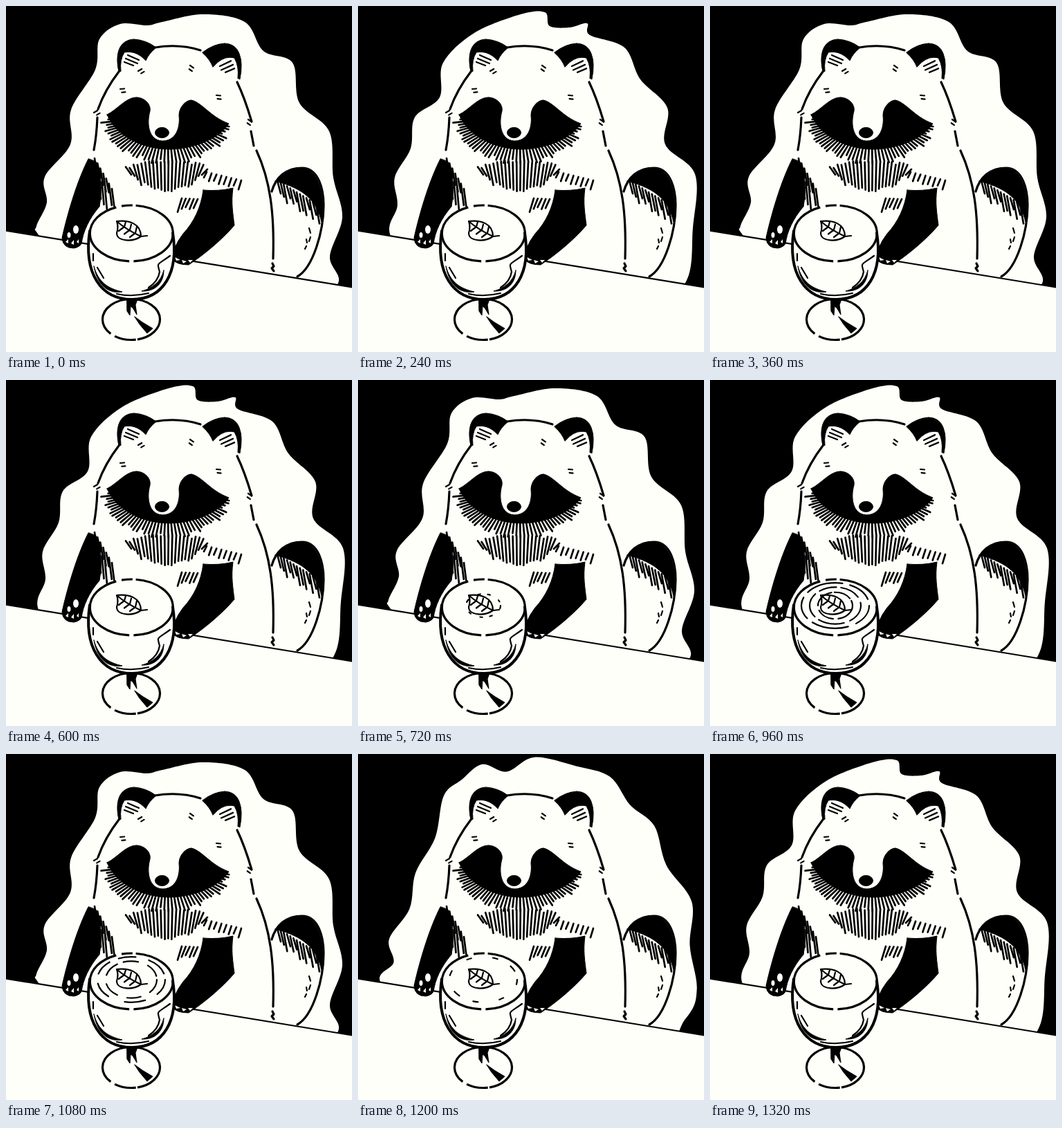
Recreate the animation shown at these times as an HTML page. Size 500 by 500 pixels, loop 1.44 s.

```html
<!DOCTYPE html>
<html lang="en">
<head>
<meta charset="utf-8">
<title>Raccoon and a drink</title>
<style>
html, body { margin: 0; width: 100%; height: 100%; overflow: hidden; background: #000; }
svg { display: block; width: 100vw; height: 100vh; }
path, ellipse { fill: none; stroke: #000; stroke-width: 3.2; stroke-linecap: round; stroke-linejoin: round; }
.ink { fill: #000; stroke-width: 1; }
.paper { fill: #fffffa; stroke: none; }
.thin { stroke-width: 2.2; }
.bold { stroke-width: 4; }
.ring { stroke-linecap: butt; }
/* the glow boils through three drawings, the ripple plays once per loop */
.glow, .ripple { visibility: hidden; animation: third 360ms step-end infinite; animation-delay: calc(var(--i) * 120ms - 360ms); }
.ripple { animation: twelfth 1440ms step-end infinite; animation-delay: calc(var(--i) * 120ms - 1440ms); }
@keyframes third { 0% { visibility: visible } 33.3333%, 100% { visibility: hidden } }
@keyframes twelfth { 0% { visibility: visible } 8.33333%, 100% { visibility: hidden } }
</style>
</head>
<body>
<svg viewBox="0 0 500 500">
  <defs>
    <path id="tick" class="thin" d="M0 0h6M2 5h5"/>
    <g id="ear">
      <path class="ink" d="M163 95C157 68 164 49 185 48Q202 49 217 60Q206 69 202 79C192 68 182 65 171 67Q164 78 166 94Z"/>
      <path class="thin" d="M176 71 192 78M173 76 190 83M171 81 184 86"/>
    </g>
  </defs>
  <g id="glow"></g>

  <path class="paper" d="M0 324.5 500 406.5V500H0Z"/>
  <path class="thin" d="M-2 324.2 502 406.8"/>
  <path class="paper" d="M125 300 270 290 330 310 318 333 270 366 130 340Z"/>

  <!-- tail -->
  <path d="M384 268C390 247 405 234 428 234C452 234 459 266 459 288C459 325 444 378 421 391"/>
  <path class="ink" d="M389 253C402 239 415 233 428 234C452 236 462 274 456 312C449 282 432 264 389 253Z"/>
  <path class="thin" d="M438 321 440 328M440 334 438 340M434 337 435 342M434 347 432 351"/>

  <!-- head and body -->
  <path d="M163 95Q143 121 133 149M132 161Q131 187 127 208M215 60Q250 54 281 64"/>
  <path d="M334 110Q345 133 355 167M354 181 358 202M362 209C382 252 388 300 386 365M385 372l2 4-3 3 3 4"/>
  <use href="#ear"/>
  <use href="#ear" transform="translate(501 1.2) scale(-1 1.1)"/>
  <path class="ink" d="M146 157C162 149 172 133 188 132C200 132 210 142 208 152C203 170 206 194 226 195C246 195 252 175 250 158C250 146 260 136 268 136C284 140 295 160 322 170C308 192 270 207 236 207C200 207 160 190 146 157Z"/>
  <ellipse class="ink" cx="225.5" cy="183" rx="10" ry="7.5"/>
  <g id="ticks"></g>
  <path id="fur" style="stroke-width:2.7"/>

  <!-- arms -->
  <path class="ink" d="M119 221C104 250 90 295 81 335Q82 350 98 350Q110 348 110 338C114 318 126 300 135 290Q142 255 130 225Z"/>
  <path class="ink" d="M285 266Q308 268 328 263C325 285 328 300 330 317C310 340 285 360 264 374Q246 374 241 366Q240 350 256 329C272 312 282 290 285 266Z"/>
  <ellipse class="paper" cx="101" cy="323" rx="4" ry="6"/>
  <ellipse class="paper" cx="91" cy="331" rx="2.5" ry="4"/>
  <path class="paper" d="M86 341l4-4v6ZM94 343l4-5v7ZM102 341l3-4v6ZM244 363l8 4-6 1ZM254 367l7 2-5 3ZM263 367h7l-4 4Z"/>

  <!-- glass -->
  <ellipse class="paper" cx="181" cy="453" rx="41.5" ry="29.5"/>
  <ellipse class="ring" cx="181" cy="453" rx="41.5" ry="29.5" pathLength="100" stroke-dasharray="21 1 14 3 61"/>
  <path class="paper" d="M121 325C112 385 136 424 182 424S250 385 241 328A60 40 0 0 0 121 325Z"/>
  <path class="bold" d="M121 325C112 385 136 424 182 424S250 385 241 328"/>
  <ellipse class="ring" cx="181.3" cy="328.5" rx="60" ry="40.5" pathLength="100" stroke-dasharray="24 2 42 2.5 5 1.5 23"/>
  <path class="ink" d="M127 376C133 398 146 408 168 413C150 416 132 406 127 376ZM228 382C224 398 212 408 196 412C214 413 228 402 228 382Z"/>
  <path class="thin" d="M160 416Q182 421 206 415M132 378 141 393M126 358V368M237 361C218 375 218 370 222 384Q220 398 206 407"/>
  <path class="ink" d="M175 424H190L187 432 189 446 183 436 180 434 179 447 175 441ZM186 449 197 457 212 466 204 473 193 460Z"/>

  <!-- leaf and ripples -->
  <path class="thin" d="M160 311C177 309 195 314 195 333C184 341 160 341 160 328Q163 319 160 311Q172 322 195 333L204 332"/>
  <path class="thin" id="veins"/>
  <g id="ripples"></g>
</svg>
<script>
const $ = id => document.getElementById(id);
let seed = 7;
const rnd = () => (seed = seed * 16807 % 2147483647) / 2147483647;
const range = n => [...Array(n).keys()];

// closed Catmull-Rom curve
function blob(p) {
  const at = i => p[(i + p.length) % p.length];
  return 'M' + p[0] + p.map((b, i) => {
    const a = at(i - 1), c = at(i + 1), e = at(i + 2);
    return `C${b.map((v, k) => v + (c[k] - a[k]) / 6)} ${c.map((v, k) => v - (e[k] - b[k]) / 6)} ${c}`;
  }).join('') + 'Z';
}

// crests and hollows of two outlines; the third moves the lobes half a step along
const points = s => s.match(/\d+ \d+/g).map(q => q.split(' ').map(Number));
const wide = points('48 332 44 318 59 284 56 247 93 200 94 150 129 92 135 48 165 26 204 28 226 23 285 12 345 23 372 65 414 82 424 140 467 181 473 248 486 305 468 362 478 404');
const tall = points('47 332 57 288 53 248 76 206 82 161 118 132 123 82 168 39 235 12 270 9 277 29 306 31 331 25 335 42 385 60 408 106 447 147 444 200 487 243 484 320 472 402');
const shifted = wide.slice(1).map((q, i) => {
  const out = 1.03 + (i % 2 ? -0.03 : 0.03);
  return [266, 230].map((c, k) => c + ((q[k] + wide[i][k]) / 2 - c) * out);
});
$('glow').innerHTML = [wide, shifted, tall].map((p, i) =>
  `<path class="paper glow" style="--i:${i}" d="${blob([...p, [400, 450], [100, 400]])}"/>`).join('');

const tick = (x, y, turn) => `<use href="#tick" transform="translate(${x} ${y}) rotate(${turn})"/>`;
$('ticks').innerHTML = tick(165, 120, -5) + tick(304, 129, 5) + tick(266, 86, 35) +
  tick(191, 94, -30) + tick(127, 154, -30) + tick(350, 164, 35);

const line = (...v) => { const [a, b, c, d] = v.map(n => n.toFixed(1)); return `M${a} ${b}L${c} ${d}`; };

// n strokes starting between two points
const row = (x1, y1, x2, y2, n, len, lean) => range(n).map(i => {
  const t = i / (n - 1), x = x1 + (x2 - x1) * t, y = y1 + (y2 - y1) * t;
  return line(x, y, x + lean, y + len * (0.65 + 0.5 * rnd()));
}).join('');

const fringe = range(46).map(i => {
  const a = Math.PI * (0.98 - 0.91 * i / 45), x = Math.cos(a), y = Math.sin(a), out = 0.95 + 0.13 * rnd();
  return line(233 + 70 * x, 160 + 46 * y, 233 + 90 * x * out, 160 + 64 * y * out);
}).join('');

const chest = range(22).map(i => {
  const t = i / 21, x = 173 + 118 * t, mid = Math.sin(Math.PI * t), top = 230 - 10 * mid + 6 * rnd();
  return line(x, top, x + 8 - 16 * t, 242 + 20 * mid + 9 * rnd());
}).join('');

$('fur').setAttribute('d', fringe + chest +
  row(128, 220, 153, 264, 7, 28, 4) +
  row(134, 246, 143, 262, 3, 30, 3) +
  row(254, 278, 277, 279, 5, 19, -6) +
  row(290, 240, 340, 252, 8, 12, -4) +
  row(392, 252, 448, 286, 13, 25, 5));

$('veins').setAttribute('d', range(3).map(i => {
  const x = 171 + 8 * i, y = 319 + 4.5 * i;
  return line(x, y, x + 2, y - 7 - i) + line(x, y, x - 8, y + 6);
}).join(''));

// rings spread, multiply, then break into short dashes
$('ripples').innerHTML = range(5).map(age => {
  const fade = Math.abs(age - 2), size = Math.min(49, 25 + 12 * age);
  const rings = range(3 - fade).map(j => {
    const rx = size - 12 * j, ry = rx * (0.67 + 0.05 * j);
    const dash = range(8).map(k => ((k % 2 ? 5 + 4 * fade : 20 - 8 * fade) * (0.5 + 0.6 * rnd())).toFixed(1));
    return `<ellipse class="thin" cx="181" cy="326" rx="${rx}" ry="${ry}" pathLength="100" stroke-dasharray="${dash}"/>`;
  });
  return `<g class="ripple" style="--i:${6 + age}">${rings.join('')}</g>`;
}).join('');
</script>
</body>
</html>
```
